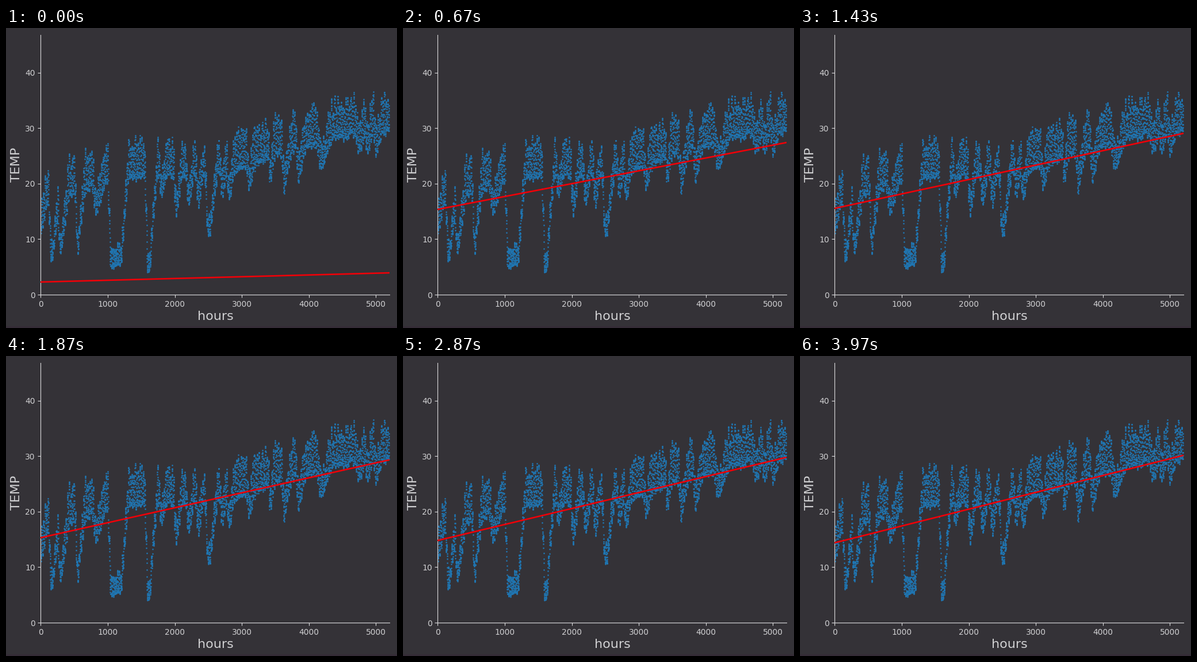
A matplotlib script that plays this animation: 680x522 px, repeating every 4010 ms.

```python
import numpy as np
import matplotlib.pyplot as plt
from matplotlib.animation import FuncAnimation
from matplotlib.patches import Rectangle

W, H, DPI = 680, 522, 100
LOOP, FRAMES = 4010, 120
HOURS = 5200
BG, TEXT, AXIS = "#343237", "#cfcfd1", "#dededf"

# Cold fronts: (arrival hour, hour it has passed, drop in degrees)
FRONTS = [
    (-60, 100, 8), (110, 290, 14), (240, 420, 13), (505, 660, 15),
    (770, 950, 7), (1000, 1310, 18.5), (1550, 1740, 20), (1755, 1880, 7.5),
    (1980, 2110, 13), (2165, 2290, 11), (2310, 2430, 12), (2445, 2640, 14.5),
    (2665, 2790, 9), (2770, 2900, 9.5), (3070, 3190, 9), (3390, 3480, 14),
    (3590, 3740, 10), (3800, 3960, 8), (4110, 4340, 6), (4700, 4840, 6),
    (4830, 4940, 9), (4960, 5100, 7),
]


def front(h, start, end, drop):
    """Cools within 40 hours, warms up again over the last 110."""
    fall = np.clip((h - start) / 40, 0, 1)
    rise = np.clip((end - h) / 110, 0, 1)
    return drop * fall * rise


def temperatures(h):
    """Seasonal warming minus cold fronts, with a daily swing below it."""
    rng = np.random.default_rng(4)
    season = 24 + 12.5 * h / HOURS + np.cos(2 * np.pi * (h - 1150) / 3300)
    chill = np.max([front(h, *f) for f in FRONTS], axis=0)
    span = np.maximum(4.2, 7.6 - 0.3 * chill)
    days = h.max() // 24 + 1
    peak = rng.uniform(0.65, 1.04, days)[h // 24]
    base = rng.uniform(-0.05, 0.1, days)[h // 24]
    swing = (0.5 - 0.5 * np.cos(2 * np.pi * (h - 5) / 24)) ** 1.15
    level = base + (peak - base) * swing + rng.normal(0, 0.03, h.size)
    return season - chill - span * (1 - level)


def fit_ends(step):
    """Line ends under gradient descent: one fast and one slow mode."""
    fast, slow = 0.862 ** step, 0.991 ** step
    left = 13.19 + 3.5 * slow - 14.41 * fast
    right = 31.19 - 3.05 * slow - 24.21 * fast
    return left, right


fig = plt.figure(figsize=(W / DPI, H / DPI), dpi=DPI, facecolor=BG)
fig.add_artist(Rectangle((0, 0), 1, 3 / H, color="#352c37", lw=0))
ax = fig.add_axes([60.4 / W, 58 / H, 606.4 / W, 452 / H], facecolor=BG)
ax.set(xlim=(0, 5202), ylim=(0, 46.8),
       xticks=range(0, 5001, 1000), yticks=range(0, 41, 10))
ax.tick_params(color=AXIS, labelcolor=TEXT, labelsize=10)
ax.spines[["top", "right"]].set_visible(False)
ax.spines[["left", "bottom"]].set_color(AXIS)

label = dict(color=TEXT, size=16, ha="center", va="baseline",
             rotation_mode="anchor")
fig.text(364 / W, 1 - 508.5 / H, "hours", **label)
fig.text(24.5 / W, 1 - 238 / H, "TEMP", rotation=90, **label)

hours = np.arange(HOURS)
ax.plot(hours, temperatures(hours), "o", ms=1.9, mew=0, color="#1f77b4")
line, = ax.plot([0, HOURS], fit_ends(0), color="#f00008", lw=1.9, zorder=5)


def update(i):
    line.set_ydata(fit_ends(i))
    return line,


anim = FuncAnimation(fig, update, frames=FRAMES, interval=LOOP / FRAMES,
                     repeat=True, repeat_delay=0)
plt.show()
```
